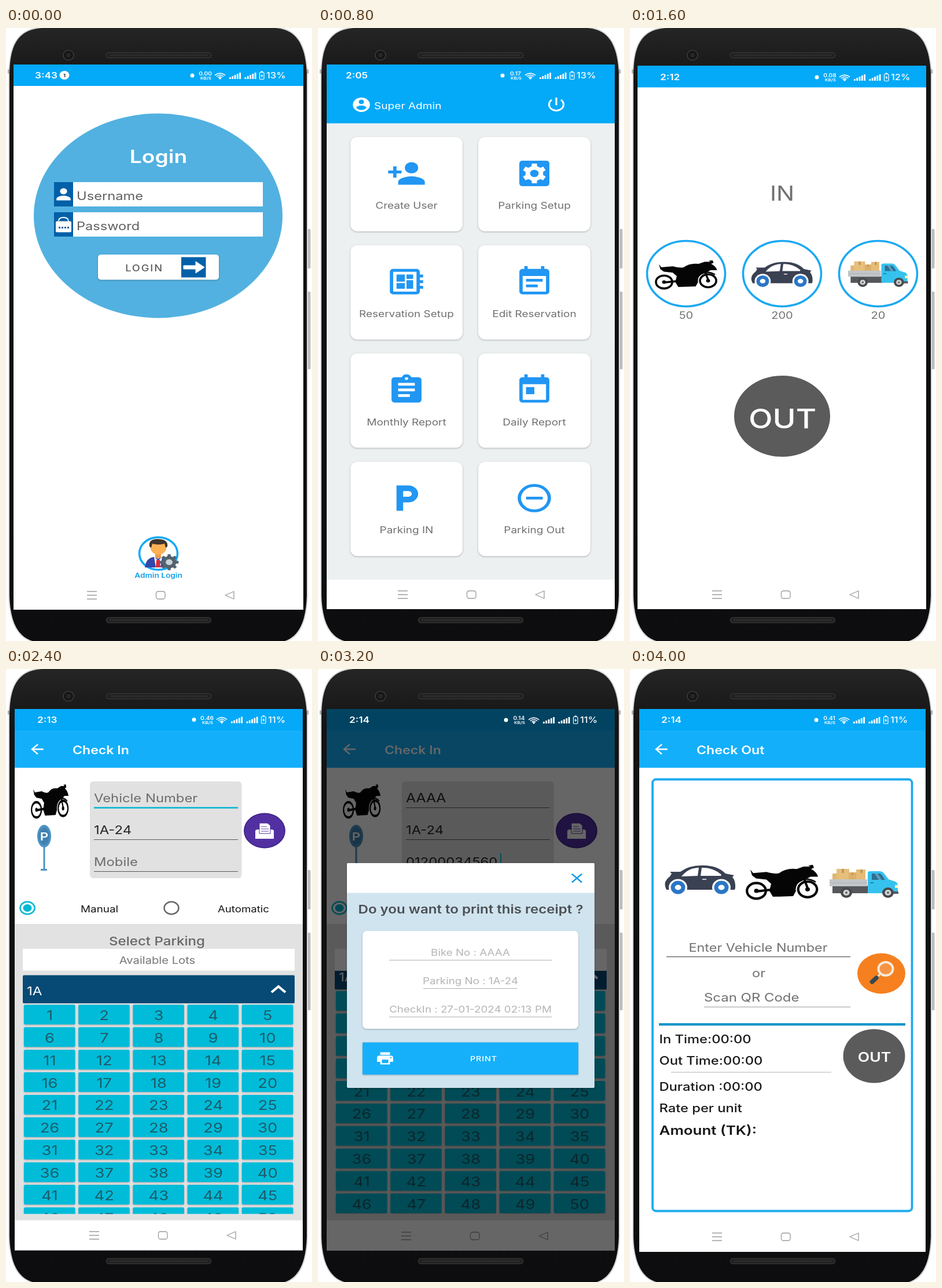
Write an HTML page that moves like this. It is 529 by 1058 pixels and loops after 4800 ms.

```html
<!DOCTYPE html>
<html lang="en">
<head>
<meta charset="utf-8">
<title>Parking app screens</title>
<style>
html, body { margin: 0; width: 100%; height: 100%; overflow: hidden; background: #fff }
svg { display: block; width: 100vw; height: 100vh }
text { font-family: Inter, Roboto, sans-serif; white-space: pre }
.raised { filter: drop-shadow(0 1.5px 1.5px #0004) }
</style>
</head>
<body>
<svg id="stage" viewBox="0 0 529 1058" preserveAspectRatio="none"></svg>
<script>
const WIDE = 1.18; // the screens are shown wider than tall
const BLUE = '#04a9f7', BAR = '#14affa', ICON = '#2196f3', GREY = '#707070', LINE = '#5a5a5a', INK = '#050505';

const rect = (x, y, w, h, fill, r = 0, more = '') =>
  `<rect x="${x}" y="${y}" width="${w}" height="${h}" rx="${r}" fill="${fill}" ${more}/>`;
const oval = (x, y, rx, ry, fill, more = '') =>
  `<ellipse cx="${x}" cy="${y}" rx="${rx}" ry="${ry}" fill="${fill}" ${more}/>`;
const ring = (x, y, rx, ry, color, w, fill = 'none') => oval(x, y, rx, ry, fill, `stroke="${color}" stroke-width="${w}"`);
const path = (d, fill, more = '') => `<path d="${d}" fill="${fill}" ${more}/>`;
const line = (d, color, w, more = '') => path(d, 'none', `stroke="${color}" stroke-width="${w}" ${more}`);
const at = (x, y, sx, sy, body) => `<g transform="translate(${x} ${y}) scale(${sx} ${sy})">${body}</g>`;
const text = (s, x, y, size, fill, weight = 400, anchor = 'start', gap = 0) =>
  at(x, y, WIDE, 1, `<text font-size="${size}" fill="${fill}" font-weight="${weight}" text-anchor="${anchor}" letter-spacing="${gap}">${s}</text>`);
const mid = (s, x, y, size, fill, weight, gap) => text(s, x, y, size, fill, weight, 'middle', gap);
const icon = (name, x, y, size, fill) =>
  at(x, y, size * WIDE, size, at(-12, -12, 1, 1, path(icons[name], fill, 'fill-rule="evenodd"')));

const calendar = 'M19 3h-1V1h-2v2H8V1H6v2H5a2 2 0 0 0-2 2v14a2 2 0 0 0 2 2h14a2 2 0 0 0 2-2V5a2 2 0 0 0-2-2zM19 19H5V8h14z';
const icons = {
  person: 'M12 12a4 4 0 1 0 0-8 4 4 0 0 0 0 8zM12 14c-2.67 0-8 1.34-8 4v2h16v-2c0-2.66-5.33-4-8-4z',
  addUser: 'M15 12a4 4 0 1 0 0-8 4 4 0 0 0 0 8zM6 10V7H4v3H1v2h3v3h2v-3h3v-2zM15 14c-2.67 0-8 1.34-8 4v2h16v-2c0-2.66-5.33-4-8-4z',
  board: 'M22 9V7h-2V5a2 2 0 0 0-2-2H4a2 2 0 0 0-2 2v14a2 2 0 0 0 2 2h14a2 2 0 0 0 2-2v-2h2v-2h-2v-2h2v-2h-2V9zM18 19H4V5h14zM6 13h5v4H6zM12 7h4v3h-4zM6 7h5v5H6zM12 11h4v6h-4z',
  note: calendar + 'M17 10H7v2h10zM14 14H7v2h7z',
  day: calendar + 'M7 10h5v5H7z',
  clip: 'M19 3h-4.18a3 3 0 0 0-5.64 0H5a2 2 0 0 0-2 2v14a2 2 0 0 0 2 2h14a2 2 0 0 0 2-2V5a2 2 0 0 0-2-2zM12 3a1 1 0 1 1 0 2 1 1 0 0 1 0-2zM14 17H7v-2h7zM17 13H7v-2h10zM17 9H7V7h10z',
  park: 'M13 3H6v18h4v-6h3a6 6 0 0 0 0-12zM13.2 11H10V7h3.2a2 2 0 0 1 0 4z',
  minus: 'M7 11v2h10v-2zM12 2a10 10 0 1 0 0 20 10 10 0 0 0 0-20zM12 20a8 8 0 1 1 0-16 8 8 0 0 1 0 16z',
  account: 'M12 2a10 10 0 1 0 0 20 10 10 0 0 0 0-20zM12 5a3 3 0 1 1 0 6 3 3 0 0 1 0-6zM12 19.2a7.2 7.2 0 0 1-6-3.22c.03-1.99 4-3.08 6-3.08s5.97 1.09 6 3.08a7.2 7.2 0 0 1-6 3.22z',
  power: 'M13 3h-2v10h2zM17.83 5.17l-1.42 1.42A7 7 0 1 1 7.58 6.58L6.17 5.17a9 9 0 1 0 11.66 0z',
  print: 'M19 8H5a3 3 0 0 0-3 3v6h4v4h12v-4h4v-6a3 3 0 0 0-3-3zM16 19H8v-5h8zM19 12a1 1 0 1 1 0-2 1 1 0 0 1 0 2zM18 3H6v4h12z',
  back: 'M20 11H7.83l5.59-5.59L12 4l-8 8 8 8 1.41-1.41L7.83 13H20z',
  close: 'M19 6.41L17.59 5 12 10.59 6.41 5 5 6.41 10.59 12 5 17.59 6.41 19 12 13.41 17.59 19 19 17.59 13.41 12z'
};

function gear(x, y, r, teeth, fill, hole) {
  const pts = [];
  for (let i = 0; i < teeth; i++)
    for (const [turn, k] of [[-.3, .75], [-.2, 1], [.2, 1], [.3, .75]]) {
      const a = (i + turn) / teeth * 2 * Math.PI - Math.PI / 2;
      pts.push([x + Math.cos(a) * r * k * WIDE, y + Math.sin(a) * r * k]);
    }
  return path('M' + pts.join('L') + 'z', fill) + oval(x, y, r * .36 * WIDE, r * .36, hole);
}

// Vehicles, each about 124 x 55 with the origin at the top left
function bike(x, y, sx, sy) {
  const wheel = (cx, cy) => oval(cx, cy, 20.5, 17, '#fff') + ring(cx, cy, 16.3, 13.2, INK, 4.2) + oval(cx, cy, 4, 3.5, INK);
  return at(x, y, sx, sy,
    path('M8 8L13 14 36 12Q50 16 58 14 70 5 88 7L100 3 112 3 108 1 116 0 118 5 113 7Q123 12 125 20L112 20 103 25 93 30 87 44 82 53 47 54 41 44 44 32 36 25 18 23 11 18z', INK) +
    wheel(18.5, 44) + wheel(107, 41.5) +
    line('M18 45L46 42M100 21L108 42', INK, 4) + line('M90 30Q104 19 121 29', INK, 2.5));
}

const car = (x, y, sx, sy) => at(x, y, sx, sy,
  path('M2 38Q-1 28 10 20L13 15 10 12 28 12Q44 0 68 1 92 1 106 15L121 18 118 21Q124 28 123 40L122 43H4z', '#3a4152') +
  path('M30 20Q42 5 60 5L58 19zM63 19L65 5Q84 4 99 17L98 19z', '#fff') + line('M66 25H73', '#fff', 1.5) +
  [24, 99].map(cx => oval(cx, 39, 16, 14.5, '#fff') + ring(cx, 39, 9, 8, '#2b76c6', 7)).join(''));

const truck = (x, y, sx, sy) => at(x, y, sx, sy,
  rect(5, 9, 16, 12, '#dfb672') + rect(12, 1, 22, 19, '#e5bf7b') + rect(33, 7, 14, 13, '#dcb06a') + rect(46, 2, 16, 18, '#e4bc77') +
  path('M21 1h4v7h-4zM38 7h3v5h-3zM53 2h4v6h-4z', '#c4975a') +
  rect(5, 30, 65, 13, '#55575a') + rect(0, 19, 65, 12, '#c3c6c8') + line('M0 25H65', '#aeb2b5', 1) +
  path('M66 43V8Q66 5 70 5H87Q92 5 96 11L102 19 114 23Q118 25 118 31V43z', '#36c2ee') +
  path('M73 9H86Q89 9 92 14L96 20H73z', '#2f6f93') + path('M78 9h5l7 11h-5z', '#5c9fc0') +
  rect(70, 24, 6, 2, '#1784ac') + rect(113, 29, 5, 5, '#fff3b0') + rect(108, 40, 11, 4, '#55575a') +
  [29, 101].map(cx => oval(cx, 42, 10, 9, '#47494c') + oval(cx, 42, 5.5, 5, '#d2d4d5') + oval(cx, 42, 2, 2, '#666')).join(''));

function status(dx, y, timeX, time, speed, charge) {
  const bars = x => [3, 5, 7, 9, 11].map((h, i) => rect(x + i * 4.3, 6 - h, 2.8, h, '#fff')).join('');
  const arc = r => `M${-r * 1.2} ${-r * .85}Q0 ${-r * 1.75} ${r * 1.2} ${-r * .85}`;
  return text(time, timeX, y + 5, 14.6, '#fff', 600) + at(dx, y, 1, 1,
    oval(322, 0, 3.5, 3.5, '#fff') +
    mid(speed, 344.5, 0, 8.6, '#fff', 600) + mid('KB/S', 345.5, 7, 6.8, '#fff', 600) +
    at(370, 6, 1, 1, line(arc(2.8) + arc(5.2) + arc(7.6), '#fff', 1.5) + oval(0, -1, 2, 1.6, '#fff')) +
    bars(386) + bars(412.5) +
    rect(438.5, -5.5, 7.5, 12, 'none', 1.5, 'stroke="#fff" stroke-width="1.2"') + rect(440.5, -7.5, 3.5, 1.5, '#fff') +
    path('M443-3l-3 4h2l-.5 3 3-4h-2z', '#fff') +
    text(charge, 450, 5, 14, '#fff', 500));
}

const nav = (dx, y, w = 0) => at(dx, y, 1, 1,
  line('M140-6.5H157M140 0H157M140 6.5H157', '#9a9a9a', 1.3) +
  rect(259.5, -6.5, 15.5, 13, 'none', 3.5, 'stroke="#9a9a9a" stroke-width="1.3"') +
  line(`M${394 - w}-6.5V6.5L${379 - w} 0z`, '#9a9a9a', 1.3, 'stroke-linejoin="round"'));

const screen = (x, y, right, bottom, fill = '#fff') => rect(x, y, right - x, bottom - y, fill);

const appBar = (title, left, right) => screen(left, 69, right, 107, BLUE) + screen(left, 106, right, 170.5, BAR) +
  icon('back', 54, 138.5, 1.15, '#fff') + text(title, 115, 146.5, 19.6, '#fff', 600);

function phone() {
  const slot = y => rect(173.5, y, 181, 9, '#1f1f1f', 4.5, 'stroke="#353535" stroke-width="1.6"') +
    line(`M180 ${y + 4.5}H349`, '#3b3b3b', 3, 'stroke-dasharray="1.5 1.5"');
  const body = 'M6 78C7 40 14 3 62 0H466C509 3 518 40 520 78V980C519 1020 508 1050 482 1058H46C18 1050 7 1020 6 980z';
  return `<defs><linearGradient id="shell" x2="0" y2="1"><stop offset="0" stop-color="#252525"/><stop offset=".06" stop-color="#1a1a1a"/><stop offset=".1" stop-color="#131313"/><stop offset="1" stop-color="#0d0d0f"/></linearGradient></defs>` +
    rect(521, 347, 5.5, 68, '#bdbdbd', 1.5) + rect(521, 455, 5.5, 134, '#bdbdbd', 1.5) +
    line(body, '#d8d8d8', 4) + path(body, 'url(#shell)') +
    line('M3 75H6M520 75H523', '#aaa', 7) +
    oval(108, 47, 9, 8.5, '#151515', 'stroke="#3c3c3c" stroke-width="1.6"') + oval(108, 47, 4, 4, '#262626') +
    slot(42.5) + slot(1017.5);
}

function login() {
  const admin = path('M240 931Q242 915 255 913L263 916 271 913Q284 916 287 931z', '#3247a8') +
    path('M256 913L263 919 270 913 267 931H259z', '#fff') + path('M260 918H266L267 931H259z', '#d92d3c') +
    rect(258, 904, 10, 11, '#ed9a4a', 3) + oval(263.5, 896, 14, 13, '#fdb155') +
    path('M248 895Q246 882 262 882 281 882 279 895L276 897 274 890Q264 893 253 890L251 897z', '#40352f') +
    gear(282, 922, 14, 8, '#53636e', '#c9d2d8');
  return screen(13, 63, 514, 1004) + screen(13, 63, 514, 100, BLUE) + status(0, 82, 50, '3:43', '0.00', '13%') +
    oval(101, 81.5, 8.5, 7.5, '#fff') + mid('1', 101, 84.5, 8, '#234', 700) +
    oval(263, 324, 215, 176.5, '#52b1e0') + mid('Login', 263.5, 233, 31.5, '#fff', 600) +
    [266, 318].map(y => rect(116, y, 328, 42, '#fff') + rect(83, y, 33, 42, '#0260a8')).join('') +
    icon('person', 99.5, 287, 1.3, '#fff') +
    line('M91 333Q91 327 99.5 327 108 327 108 334', '#fff', 1.8) + rect(86, 333.5, 27, 19, '#fff', 2) +
    line('M91 344.5H109', '#0260a8', 3, 'stroke-dasharray="3 2"') +
    text('Username', 122, 296.5, 20.1, '#606060') + text('Password', 122, 348.5, 20, '#606060') +
    rect(159, 391, 209, 43.5, '#fff', 5, 'class="raised"') + mid('LOGIN', 239, 420, 15.5, '#5c5c5c', 500, 1.6) +
    rect(303, 395.5, 42.5, 35, '#0260a8') + path('M307 410H328V403L343 413 328 423V416H307z', '#fff', 'stroke="#fff" stroke-linejoin="round"') +
    ring(263.5, 907, 33, 28, '#14a9f5', 3.6) + admin + mid('Admin Login', 263.5, 949, 11.6, '#149fe8', 600) + nav(0, 979);
}

function menu() {
  const cards = [['addUser', 'Create User'], ['', 'Parking Setup'], ['board', 'Reservation Setup'], ['note', 'Edit Reservation'],
    ['clip', 'Monthly Report'], ['day', 'Daily Report'], ['park', 'Parking IN'], ['minus', 'Parking Out']];
  return screen(15, 63, 513, 1003) + screen(15, 63, 513, 952, '#ecf0f1') + screen(15, 63, 513, 164.5, BLUE) +
    status(-3, 82, 48, '2:05', '0.17', '13%') + icon('account', 75, 132.5, 1.25, '#fff') +
    text('Super Admin', 97, 139.5, 16.2, '#fff') + icon('power', 412, 132, 1.32, '#fff') +
    cards.map(([name, label], i) => {
      const x = i % 2 * 221, y = (i >> 1) * 186.8, cx = x + 153;
      return rect(x + 56, y + 188, 194, 163, '#fff', 12, 'class="raised"') +
        (name ? icon(name, cx, y + 251, 2.44, ICON)
          : rect(cx - 26, y + 229, 52, 44, ICON, 5) + gear(cx, y + 251, 17.5, 6, '#fff', ICON)) +
        mid(label, cx, y + 312, 16.1, GREY);
    }).join('') + nav(-2, 978, 1);
}

function parkIn() {
  const spots = [97, 263, 429].map((x, i) => ring(x, 424, 67.5, 56.5, '#1ba9f3', 3.6) +
    mid([50, 200, 20][i], x, 502, 17, GREY)).join('');
  return screen(13, 65, 512, 1003) + screen(13, 65, 512, 102.5, BLUE) + status(1, 85, 52, '2:12', '0.08', '12%') +
    mid('IN', 263, 298, 35, GREY) + spots + bike(43, 401, .86, .85) + car(208.5, 403, .87, .87) + truck(377, 402, .87, .88) +
    oval(263, 670, 83, 70, '#5b5b5b') + mid('OUT', 263.5, 690.5, 46, '#fff', 500) + nav(2, 978, 1);
}

// The lot list scrolls under the "Available Lots" bar
function checkIn(filled) {
  const fields = filled ? ['AAAA', '1A-24', '01200034560'] : ['Vehicle Number', '1A-24', 'Mobile'];
  const scroll = filled ? -23.8 : 0, top = filled ? 521 : 525, clip = 'lots' + +filled;
  let cells = '';
  for (let i = 0; i < 50; i++) {
    const x = 31 + i % 5 * 94.2, y = 579.5 + Math.floor(i / 5) * 38.85;
    cells += rect(x, y, 88.5, 34, '#00bcd9', 2, 'class="raised"') + mid(i + 1, x + 44.5, y + 26.5, 23.2, '#1d5c69');
  }
  const sign = line('M66 300V346M60 346.5H71', '#4d93c0', 3) + oval(66, 288.5, 12, 19.5, '#4c93c3') +
    oval(66, 288.5, 9, 15, '#3f82b2') + mid('P', 66, 295.5, 19, '#fff', 600);
  return screen(15, 69, 513, 1003.5) + appBar('Check In', 15, 513) +
    bike(43, 199, .52, 1) + sign +
    rect(145, 194, 262.5, 167, '#e1e1e1', 6) +
    fields.map((s, i) => text(s, 152, 229.5 + i * 55.3, i == 0 && filled ? 21 : 20.2, filled || i == 1 ? '#222' : '#6c6c6c') +
      line(`M152 ${239.5 + i * 55}H401`, !i && !filled ? '#00b5d3' : LINE, !i && !filled ? 2.6 : 1.2)).join('') +
    (filled ? line('M316 318V342', '#00bcd9', 2) : '') +
    oval(447, 279, 35, 29.5, '#5230a2', 'stroke="#43268c" stroke-width="2"') +
    path('M431 280Q431 277 435 277H459Q463 277 463 280V293H431z', '#fff') +
    path('M438 266H452L457 270V284H438z', '#fff', 'stroke="#5230a2" stroke-width="1"') +
    line('M441 272H451M441 276H454M441 280H454', '#5230a2', .9) +
    ring(37, 412.5, 12.5, 10.7, '#00b8d4', 2.6) + oval(37, 412.5, 7.5, 6.4, '#00b8d4') + ring(286, 412.5, 12.5, 10.7, '#6b6b6b', 2.6) +
    text('Manual', 129, 420, 16, '#151515') + text('Automatic', 366, 420, 15.8, '#151515') +
    screen(15, 440, 513, 951.5, '#e2e2e2') + mid('Select Parking', 261, 476.5, 20.4, '#666', 500) +
    rect(29, 483, 470, 37.5, '#fff') + mid('Available Lots', 261.5, 509, 17.1, '#757575') +
    `<clipPath id="${clip}">${rect(15, top, 498, 940.5 - top, '#000')}</clipPath><g clip-path="url(#${clip})">` +
    at(0, scroll, 1, 1, rect(29, 528.5, 470, 48.5, '#064a75', 2) + text('1A', 36, 563, 20.5, '#fff') +
      line('M459 558L471 548 483 558', '#fff', 4.2) + cells) + '</g>';
}

function dialog() {
  const rows = [['Bike No : AAAA', 123, 404], ['Parking No : 1A-24', 182, 344.5], ['CheckIn : 27-01-2024 02:13 PM', 123, 404]];
  return checkIn(true) + nav(4, 978.5, 1) + screen(15, 69, 513, 1003.5, '#0009') + status(3, 88, 54, '2:14', '0.14', '11%') +
    rect(50, 335, 428, 388, '#d0e4ef', 2, 'class="raised"') + rect(50, 335, 428, 51.5, '#fff', 2) +
    icon('close', 447.5, 361, 1.17, '#1e9be8') +
    mid('Do you want to print this receipt ?', 264, 422, 20.4, '#4a4f54', 600) +
    rect(77, 452, 373, 169, '#fff', 7, 'class="raised"') +
    rows.map(([s, x1, x2], i) => mid(s, 263.5, 494.5 + i * 49, 15.9, '#b4b4b4') +
      line(`M${x1} ${502.5 + i * 49}H${x2}`, '#b0b0b0', 1.1)).join('') +
    rect(77, 644.5, 373, 55.5, '#16b0fa', 1, 'class="raised"') + icon('print', 116, 672, 1.18, '#fff') +
    mid('PRINT', 286.5, 677, 12.2, '#fff', 500, .7);
}

function checkOut() {
  const labels = [['In Time:00:00', 646], ['Out Time:00:00', 683], ['Duration :00:00', 727.5], ['Rate per unit', 764.5]];
  return screen(16, 69, 511, 1006) + appBar('Check Out', 16, 511) + status(0, 88, 54, '2:14', '0.41', '11%') +
    rect(39, 190.5, 448.5, 745, 'none', 6, 'stroke="#1fabef" stroke-width="3.8"') +
    car(59, 338, 1, 1) + bike(200, 338, 1, 1.02) + truck(345, 344, 1, 1) +
    mid('Enter Vehicle Number', 221.5, 488, 19.8, GREY) + line('M63 496.7H381', LINE, 1.2) +
    mid('or', 222.5, 532, 20, GREY) + text('Scan QR Code', 128, 574, 20.3, GREY) + line('M128 583.3H381', '#999', 1) +
    oval(434.5, 525.5, 41.5, 35, '#f6801f') +
    line('M432 527L426 533', '#f4e6d2', 3) + line('M426 533L418.5 540', '#37474f', 7.5, 'stroke-linecap="round"') +
    ring(442, 517.5, 12.5, 11.5, '#f7ead8', 4, '#f79444') +
    line('M50 613.3H476', '#0f93c8', 4.2) +
    labels.map(([s, y]) => text(s, 50.5, y, 20.1, '#1a1a1a', 500)).join('') +
    line('M71 696H348', '#d8d8d8', 2) + text('Amount (TK):', 50.5, 804, 22, '#161616', 600) +
    oval(422, 668, 53.5, 46.5, '#5b5b5b') + mid('OUT', 422.5, 678, 22.5, '#fff', 600) + nav(2, 980, 1);
}

const scenes = [login(), menu(), parkIn(),
  checkIn(false) + status(3, 87.5, 54, '2:13', '0.46', '11%') + nav(4, 977.5, 1), dialog(), checkOut()];
const stage = document.getElementById('stage');
stage.innerHTML = phone() + scenes.map(s => `<g class="scene" display="none">${s}</g>`).join('');
const groups = stage.querySelectorAll('.scene');

const start = performance.now();
let shown = -1;
function draw(now) {
  const next = Math.floor(Math.max(0, now - start) / 800) % groups.length;
  if (next !== shown) {
    groups.forEach((g, i) => g.setAttribute('display', i === next ? 'inline' : 'none'));
    shown = next;
  }
  requestAnimationFrame(draw);
}
draw(start);
</script>
</body>
</html>
```
